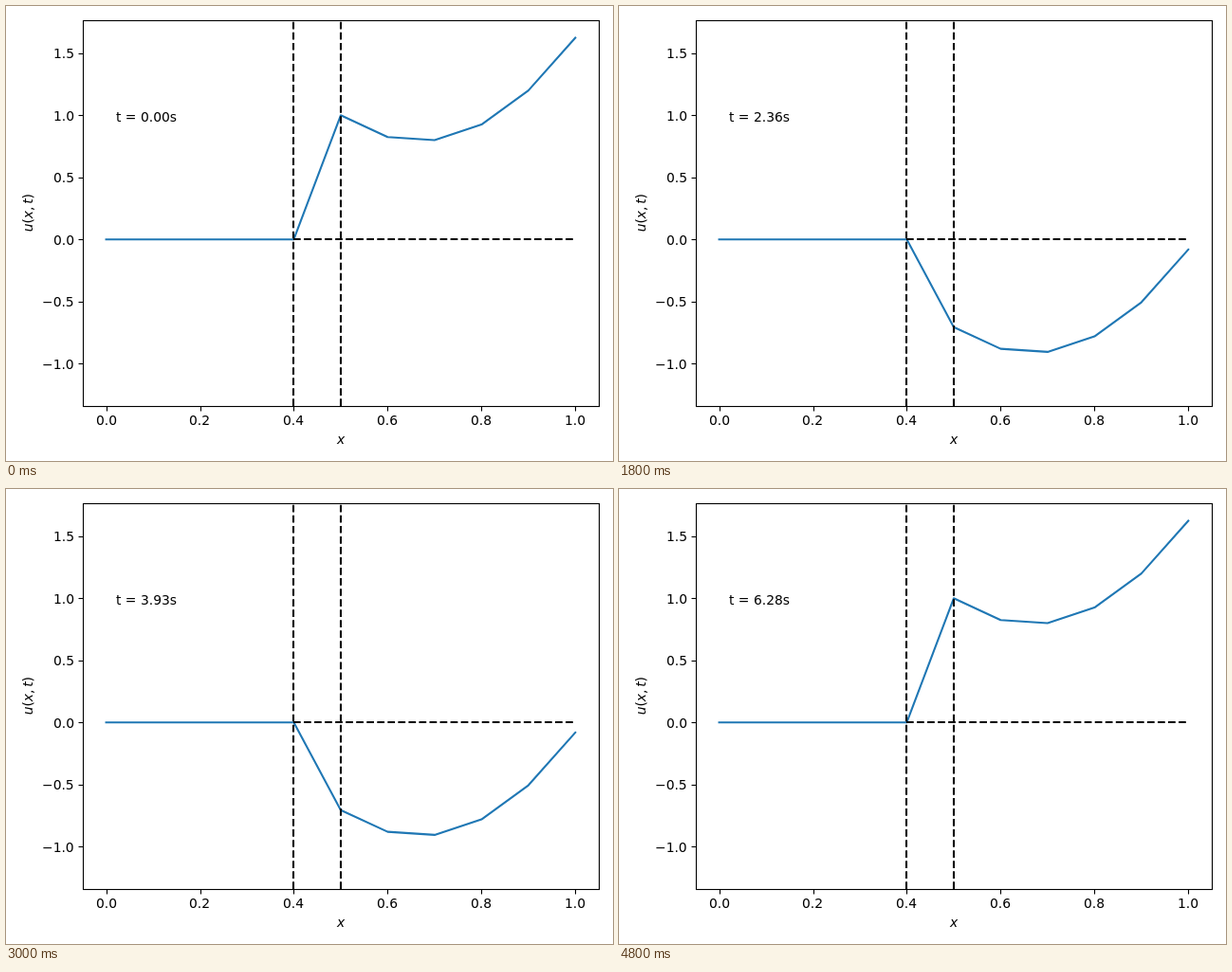
An HTML page with a canvas for the animation above (5 s loop, 640 by 480 pixels).

```html
<!DOCTYPE html>
<html lang="en">
<head>
<meta charset="utf-8">
<style>
html, body { margin: 0; width: 100%; height: 100%; overflow: hidden; background: #fff; }
canvas { display: block; }
</style>
</head>
<body>
<canvas id="plot" width="640" height="480"></canvas>
<script>
const ctx = document.getElementById("plot").getContext("2d");
const LEFT = 80.85, RIGHT = 625, TOP = 15, BOTTOM = 421.72;
const Y_MIN = -1.34125, Y_MAX = 1.76625;
const STEPS = 24, STEP_MS = 200;
const SIZE = 13.889;
const FONT = `${SIZE}px "DejaVu Sans", sans-serif`;

const px = x => LEFT + (RIGHT - LEFT) * (x + 0.05) / 1.1;
const py = y => BOTTOM - (BOTTOM - TOP) * (y - Y_MIN) / (Y_MAX - Y_MIN);
const mid = v => Math.round(v) + 0.5;

function path(points, color, width, dash = [], cap = "butt") {
  ctx.beginPath();
  points.forEach(([x, y]) => ctx.lineTo(x, y));
  ctx.strokeStyle = color;
  ctx.lineWidth = width;
  ctx.lineCap = cap;
  ctx.lineJoin = "round";
  ctx.setLineDash(dash);
  ctx.stroke();
}

// anchor: 0 = left, 0.5 = centre, 1 = right; text starts on whole pixels
function label(str, x, y, anchor = 0, font = FONT) {
  ctx.font = font;
  ctx.fillStyle = "#000";
  ctx.fillText(str, Math.round(x - anchor * ctx.measureText(str).width), Math.round(y));
}

function drawCurve(t) {
  const points = [];
  for (let i = 0; i <= 10; i++) {
    const s = (i - 5) / 10;
    const u = i < 5 ? 0 : Math.cos(t) + 7.5 * s * s - 2.5 * s;
    points.push([px(i / 10), py(u)]);
  }
  path(points, "#1f77b4", 2.083, [], "square");
}

function drawGuide(x1, y1, x2, y2) {
  const ends = [[x1, y1], [x2, y2]].map(p => p.map(Math.round));
  path(ends, "#000", 2.083, [7.708, 3.333]);
}

function drawAxes() {
  const l = mid(LEFT), r = mid(RIGHT), t = mid(TOP), b = mid(BOTTOM);
  ctx.setLineDash([]);
  ctx.lineWidth = 1.111;
  ctx.lineJoin = "miter";
  ctx.strokeStyle = "#000";
  ctx.strokeRect(l, t, r - l, b - t);
  for (let i = 0; i <= 5; i++) {
    const v = i / 5, x = mid(px(v));
    path([[x, b], [x, b + 5]], "#000", 1.111);
    label(v.toFixed(1), px(v), 442, 0.5);
  }
  for (let i = -2; i <= 3; i++) {
    const v = i / 2, y = mid(py(v));
    path([[l, y], [l - 5, y]], "#000", 1.111);
    label(v.toFixed(1).replace("-", "\u2212"), 72, py(v) + 5.5, 1);
  }
}

function drawNames() {
  const italic = "italic " + FONT;
  label("x", (LEFT + RIGHT) / 2, 462, 0.5, italic);
  ctx.save();
  ctx.translate(28, (TOP + BOTTOM) / 2);
  ctx.rotate(-Math.PI / 2);
  let x = -20;
  for (const ch of "u(x,t)") {
    ctx.font = /[a-z]/.test(ch) ? italic : FONT;
    ctx.fillText(ch, x, 0);
    x += ctx.measureText(ch).width + (ch === "," ? 2.7 : 0);
  }
  ctx.restore();
}

function draw(now) {
  const step = Math.floor(now / STEP_MS) % (STEPS + 1);
  const t = step * 2 * Math.PI / STEPS;
  ctx.fillStyle = "#fff";
  ctx.fillRect(0, 0, 640, 480);
  drawCurve(t);
  drawGuide(px(0.4), BOTTOM, px(0.4), TOP);
  drawGuide(px(0.5), BOTTOM, px(0.5), TOP);
  drawGuide(px(0.4), py(0), px(1), py(0));
  drawAxes();
  drawNames();
  label(`t = ${t.toFixed(2)}s`, 116, py(0.95));
}

let start;
function tick(now) {
  start ??= now;
  draw(now - start);
  requestAnimationFrame(tick);
}
requestAnimationFrame(tick);
</script>
</body>
</html>
```
